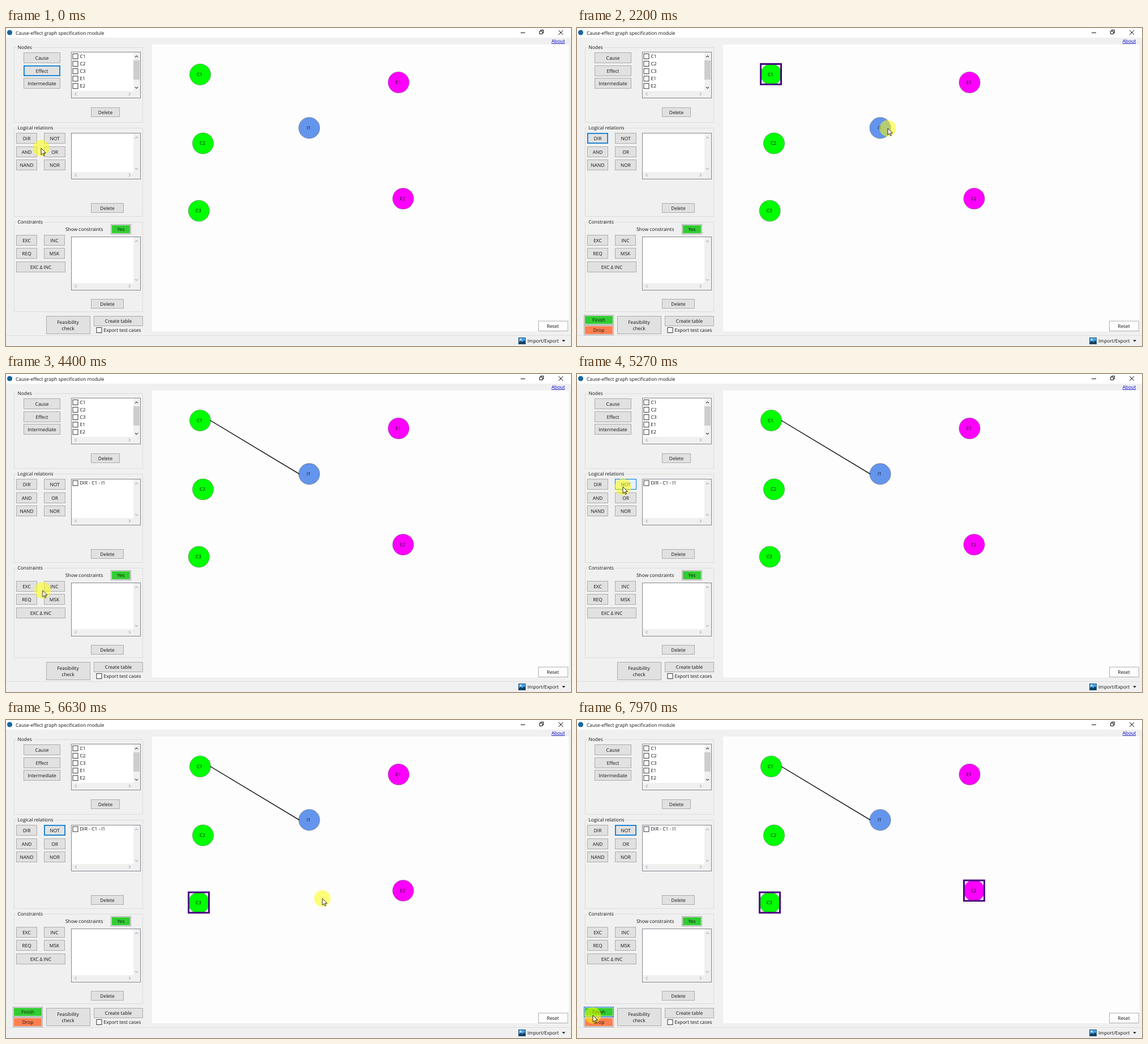
An HTML page that plays this animation: 998 by 561 pixels, repeating every 8 s.

```html
<!DOCTYPE html>
<html lang="en">
<head>
<meta charset="utf-8">
<title>Cause-effect graph specification module</title>
<style>
html, body { margin: 0; width: 100%; height: 100%; overflow: hidden; background: #f0f0f0; }
svg { display: block; width: 100%; height: 100%; }
text { font: 8.4px "Open Sans", "Noto Sans", sans-serif; fill: #111; text-rendering: geometricPrecision; white-space: pre; }
.mid { text-anchor: middle; }
.btn { fill: #e1e1e1; stroke: #adadad; }
.hot { fill: #e5f1fb; stroke: #0078d7; }
.ring { fill: none; stroke: #0078d7; }
.focus { fill: none; stroke: #0078d7; stroke-width: 1.7; }
.group { fill: none; stroke: #dcdcdc; }
.list { fill: #fff; stroke: #828790; }
.bar { fill: #f0f0f0; }
.box { fill: #fff; stroke: #333; }
.node { stroke: #555; stroke-opacity: .6; stroke-width: .8; }
.sel { fill: none; stroke: #4b0082; stroke-width: 3; }
.chev { fill: none; stroke: #b8b8b8; stroke-width: 1.2; }
.dark { stroke: #505050; }
.thin { fill: none; stroke: #111; stroke-width: 1; }
#pointer { animation: travel 8s infinite; }
@keyframes travel {
  0%, .875% { transform: translate(62px, 212px); animation-timing-function: ease-in-out; }
  4.1%, 5.6% { transform: translate(40px, 198px); animation-timing-function: ease-in; }
  11.25% { transform: translate(314px, 152px); animation-timing-function: ease-out; }
  15.75% { transform: translate(345px, 85px); animation-timing-function: linear; }
  19.5% { transform: translate(347px, 86px); animation-timing-function: ease-in-out; }
  27.5%, 30.4% { transform: translate(549px, 177px); animation-timing-function: ease-in-out; }
  40%, 42.5% { transform: translate(54px, 513px); animation-timing-function: ease-out; }
  44.125%, 48% { transform: translate(51px, 518px); animation-timing-function: ease-in-out; }
  63.375%, 65.5% { transform: translate(83px, 197px); animation-timing-function: linear; }
  65.875%, 68% { transform: translate(81px, 199px); animation-timing-function: ease-in-out; }
  77%, 79.2% { transform: translate(341px, 323px); animation-timing-function: ease-in; }
  82.875% { transform: translate(558px, 315px); animation-timing-function: ease-out; }
  86.5%, 89% { transform: translate(701px, 304px); animation-timing-function: ease-in-out; }
  99.6%, 100% { transform: translate(28px, 521px); }
}
</style>
</head>
<body>
<script>
const LOOP = 8000;
const css = [];
let count = 0;

const rect = (cls, x, y, w, h, extra = '') =>
  `<rect class="${cls}" x="${x}" y="${y}" width="${w}" height="${h}" ${extra}/>`;
const fill = (color, x, y, w, h) => rect('', x, y, w, h, `fill="${color}"`);
const text = (s, x, y, cls = '') => `<text class="${cls}" x="${x}" y="${y + 3}">${s}</text>`;
const path = (cls, d) => `<path class="${cls}" d="${d}"/>`;

// Shows the content only between the given [start, end] times in ms
function during(spans, content) {
  const name = 'show' + count++;
  const at = ms => (ms / LOOP * 100).toFixed(4) + '%';
  let frames = spans[0][0] > 0 ? '0% {opacity:0}' : '';
  for (const [a, b] of spans) {
    frames += `${at(a)} {opacity:1}` + (b < LOOP ? `${at(b)} {opacity:0}` : '100% {opacity:1}');
  }
  if (spans.at(-1)[1] < LOOP) frames += '100% {opacity:0}';
  css.push(`@keyframes ${name} {${frames}} .${name} {animation:${name} 8s step-end infinite}`);
  return `<g class="${name}">${content}</g>`;
}

const button = (label, x, y, w, h, cls = 'btn') =>
  rect(cls, x + .5, y + .5, w - 1, h - 1) + text(label, x + w / 2, y + h / 2, 'mid');
const focus = (x, y, w, h) => rect('focus', x + .9, y + .9, w - 1.8, h - 1.8);
const check = (label, x, y) => rect('box', x + .5, y - 4.5, 9, 9) + text(label, x + 13, y - .5);
const colored = (label, color, x, y, w, h) =>
  rect('btn', x + .5, y + .5, w - 1, h - 1) + fill(color, x + 2, y + 2, w - 4, h - 4) +
  text(label, x + w / 2, y + h / 2, 'mid');

function group(label, y, h, gap) {
  return rect('group', 14.5, y + .5, 227, h) + fill('#f0f0f0', 19, y - 3, gap, 7) + text(label, 20.5, y);
}

function list(y, h, scrolls) {
  const foot = y + h - 7.5, low = y + h - 20;
  const v = scrolls ? 'chev dark' : 'chev';
  return rect('list', 115.5, y + .5, 122, h - 1) +
    rect('bar', 225, y + 1, 12, h - 2) + rect('bar', 116, y + h - 13, 109, 12) +
    (scrolls ? fill('#cdcdcd', 225, y + 15, 11, 34) : '') +
    path(v, `M228 ${y + 9.5}l2.5 -2.5l2.5 2.5`) +
    path(v, `M228 ${low}l2.5 2.5l2.5 -2.5`) +
    path('chev', `M124.5 ${foot - 2.5}l-2.5 2.5l2.5 2.5`) +
    path('chev', `M217 ${foot - 2.5}l2.5 2.5l-2.5 2.5`);
}

const node = (label, color, x, y) =>
  `<circle class="node" cx="${x}" cy="${y}" r="18.6" fill="${color}"/>` + text(label, x - 1, y - .5, 'mid');
const select = (x, y) => rect('sel', x - 18, y - 18, 36, 36);

const windowFrame = [
  fill('#f0f0f0', 0, 0, 998, 561),
  fill('#fff', 0, 0, 998, 17),
  '<circle cx="6.5" cy="8" r="4.6" fill="#17669f"/>',
  text('Cause-effect graph specification module', 17, 8.5),
  path('thin', 'M909 8.5h8M942.5 5.5h5v5h-5zM944.5 5.5v-2h5v5h-2M976 4l8 8M984 4l-8 8'),
  '<text x="963.5" y="26" style="fill:#0000d0;text-decoration:underline">About</text>',
  fill('#fdfdfd', 258, 29, 736, 506),
  fill('#dedede', 0, 542, 998, 1),
];

const panels = [
  group('Nodes', 34, 132, 28),
  button('Cause', 31, 43, 65, 19),
  button('Effect', 31, 66, 65, 19),
  button('Intermediate', 31, 88, 65, 19),
  list(42, 82, true),
  ...['C1', 'C2', 'C3', 'E1', 'E2'].map((s, i) => check(s, 117.5, 50 + i * 13.1)),
  button('Delete', 150, 140, 51, 17),

  group('Logical relations', 176, 156, 66),
  button('DIR', 18, 185, 37, 19),
  button('NOT', 67, 185, 38, 19),
  button('AND', 18, 209, 37, 19),
  button('OR', 67, 209, 38, 19),
  button('NAND', 18, 232, 37, 19),
  button('NOR', 67, 232, 38, 19),
  list(185, 82, false),
  button('Delete', 150, 309, 58, 17),

  group('Constraints', 342, 158, 48),
  text('Show constraints', 105, 355),
  colored('Yes', '#32cd32', 185, 346, 36, 18),
  button('EXC', 18, 365, 37, 19),
  button('INC', 67, 365, 37, 19),
  button('REQ', 18, 388, 37, 19),
  button('MSK', 67, 388, 37, 19),
  button('EXC Δ INC', 18, 412, 87, 19),
  list(368, 95, false),
  button('Delete', 150, 478, 58, 17),

  button('', 71, 508, 78, 32),
  text('Feasibility', 109.5, 518.5, 'mid'),
  text('check', 109.5, 529.5, 'mid'),
  button('Create table', 155, 508, 87, 18),
  check('Export test cases', 159.5, 533),
  rect('', 940.5, 517, 52, 17.5, 'fill="#fdfdfd" stroke="#adadad"'),
  text('Reset', 966, 526, 'mid'),

  rect('', 905.5, 546.5, 12, 11, 'fill="#4aa3e8" stroke="#24567f"'),
  '<circle cx="909" cy="549.5" r="1.5" fill="#fff"/>',
  '<path d="M906 557v-3l3 -2l3 2l3 -3l2 2v4z" fill="#12405f"/>',
  text('Import/Export', 921, 552),
  '<path d="M982 550.5h6l-3 3z" fill="#111"/>',
];

const graph = [
  node('C1', '#0f0', 343, 82),
  node('C2', '#0f0', 348, 203.5),
  node('C3', '#0f0', 340.7, 322.5),
  node('E1', '#f0f', 693.5, 96),
  node('E2', '#f0f', 701.5, 301),
  node('I1', '#6495ed', 535.6, 176.3),
];

const changes = [
  during([[0, 400]], focus(31, 66, 65, 19)),
  during([[230, 540]], button('DIR', 18, 185, 37, 19, 'hot')),
  during([[400, 3770]], focus(18, 185, 37, 19)),
  during([[400, 3770], [5420, LOOP]],
    colored('Finish', '#32cd32', 12, 506, 53, 18) + colored('Drop', '#ff7f50', 12, 524, 53, 18)),
  during([[3120, 3770], [7800, LOOP]], rect('ring', 12.5, 506.5, 52, 17)),
  during([[1420, 3770]], select(342.5, 81.5)),
  during([[2430, 3770]], select(535.5, 176)),
  during([[3770, LOOP]],
    '<path d="M361 82L518 176.3" stroke="#000" stroke-width="1.4"/>' + check('DIR - C1 - I1', 117.5, 192.5)),
  during([[4960, 5640]], button('NOT', 67, 185, 38, 19, 'hot')),
  during([[5420, LOOP]], focus(67, 185, 38, 19)),
  during([[6270, LOOP]], select(340.5, 322)),
  during([[7050, LOOP]], select(701.5, 301)),
];

const pointer = `<g id="pointer">
  <circle r="14.6" fill="#ff0" fill-opacity=".52"/>
  <path d="M0 0V11.6L2.7 9.1L4.5 13.2L6.3 12.4L4.5 8.4H8.2Z" fill="#fff" stroke="#111" stroke-width=".9"/>
</g>`;

document.body.innerHTML = '<svg viewBox="0 0 998 561" preserveAspectRatio="none">' +
  [...windowFrame, ...panels, ...graph, ...changes, pointer].join('') + '</svg>';
const style = document.createElement('style');
style.textContent = css.join('\n');
document.head.append(style);
</script>
</body>
</html>
```
